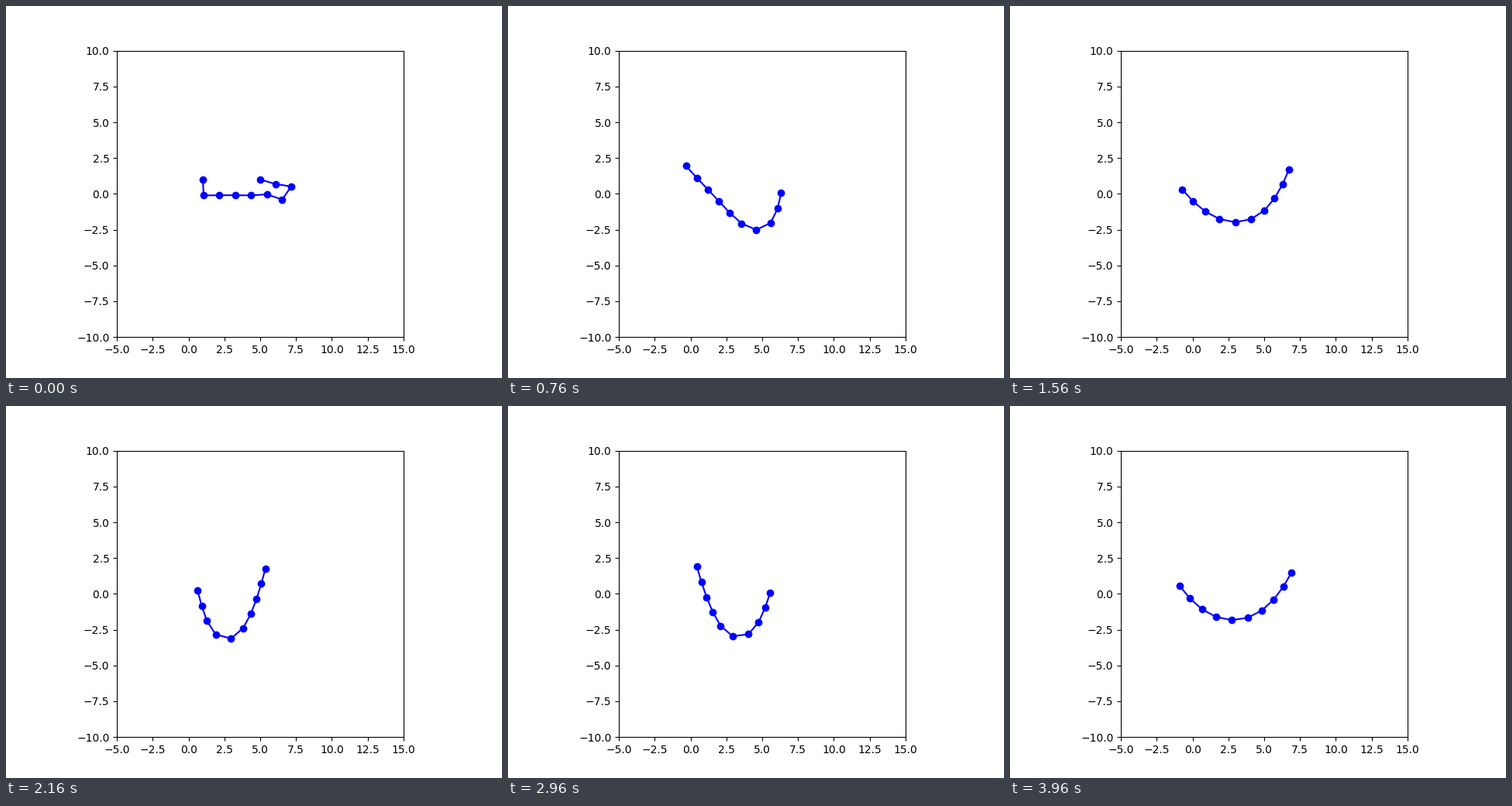
These frames come from a looping animation (640 by 480 pixels, 4000 ms). A matplotlib script:

```python
import numpy as np
import matplotlib.pyplot as plt
from matplotlib.animation import FuncAnimation

COUNT = 10          # points on the rope
LENGTH = 10.0
REST = LENGTH / (COUNT - 1)
GRAVITY = np.array([0.0, -9.8])
DT = 0.1
PASSES = 20         # constraint passes per step
FRAMES = 100


def anchors(t):
    """Both rope ends circle in opposite directions."""
    left = np.array([np.cos(t), 1 + np.sin(t)])
    right = np.array([6 - np.cos(t), 1 - np.sin(t)])
    return left, right


def relax(pos):
    """Pull every link towards its rest length; the ends stay pinned."""
    last = COUNT - 2
    for i in range(COUNT - 1):
        delta = pos[i + 1] - pos[i]
        dist = np.hypot(*delta)
        shift = delta * (dist - REST) / dist
        if i == 0:
            pos[1] -= shift
        elif i == last:
            pos[last] += shift
        else:
            pos[i] += 0.5 * shift
            pos[i + 1] -= 0.5 * shift


def simulate():
    pos = np.column_stack([np.linspace(0, LENGTH, COUNT), np.zeros(COUNT)])
    old = pos.copy()
    path = []
    for k in range(FRAMES):
        new = 2 * pos - old + GRAVITY * DT ** 2
        old, pos = pos, new
        pos[0], pos[-1] = anchors(k * DT)
        for _ in range(PASSES):
            relax(pos)
        path.append(pos.copy())
    return path


path = simulate()

fig, ax = plt.subplots(figsize=(6.4, 4.8), dpi=100)
ax.set_xlim(-5, 15)
ax.set_ylim(-10, 10)
ax.set_aspect("equal")
rope, = ax.plot([], [], "bo-")


def update(k):
    rope.set_data(path[k][:, 0], path[k][:, 1])
    return rope,


def reset():
    return update(0)


anim = FuncAnimation(fig, update, frames=FRAMES, init_func=reset,
                     interval=40, repeat=True, repeat_delay=0)
plt.show()
```
